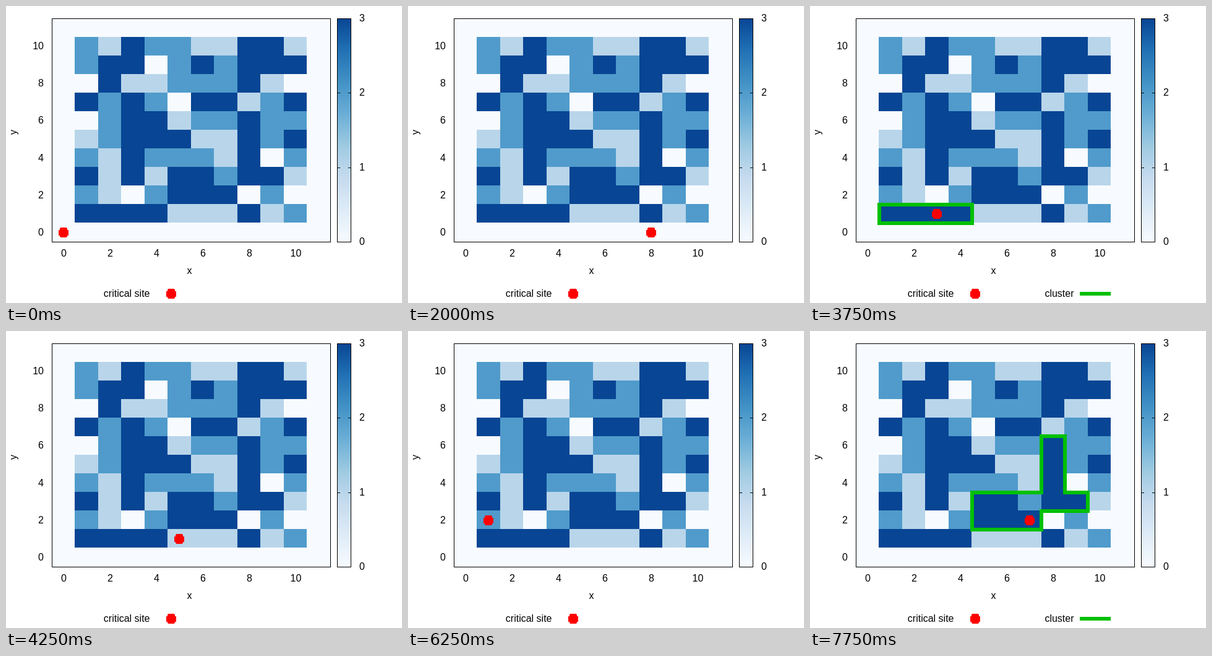
These frames come from a looping animation (640 by 480 pixels, 8000 ms). An HTML page with a canvas:

```html
<!DOCTYPE html>
<html lang="en">
<head>
<meta charset="utf-8">
<title>Critical site scan</title>
<style>
html, body { margin: 0; width: 100%; height: 100%; overflow: hidden; background: #fff; }
canvas { display: block; }
</style>
</head>
<body>
<canvas id="stage" width="640" height="480"></canvas>
<script>
const ctx = document.getElementById('stage').getContext('2d');

const LOOP = 8000, STEP = 250, COLS = 12;
const LEFT = 74, TOP = 20, BOTTOM = 381;
const CELL_W = 37.5, CELL_H = (BOTTOM - TOP) / COLS;
const RED = '#ff0000', GREEN = '#00c000';
const LEVELS = ['#f7fbff', '#b9d5ea', '#509bcb', '#084594'];
const BLUES = ['#f7fbff', '#deebf7', '#c6dbef', '#9ecae1',
               '#6baed6', '#4292c6', '#2171b5', '#084594'];

// Cell levels, top row (y = 10) first
const GRID = [
  '2132211331', '2330232333', '0311222310', '3232033123', '0233122322',
  '1233311323', '2132221302', '3131332331', '2102333020', '3333111312'
];

// Cluster outlines in axis units, keyed by the sites that reveal them
const CLUSTERS = [
  { y: 1, from: 1, to: 4, outline: [[.5, .5], [4.5, .5], [4.5, 1.5], [.5, 1.5]] },
  { y: 1, from: 8, to: 8, outline: [[7.5, .5], [8.5, .5], [8.5, 1.5], [7.5, 1.5]] },
  { y: 2, from: 5, to: 7, outline: [
    [4.5, 1.5], [7.5, 1.5], [7.5, 2.5], [9.5, 2.5], [9.5, 3.5],
    [8.5, 3.5], [8.5, 6.5], [7.5, 6.5], [7.5, 3.5], [4.5, 3.5]] }
];

const px = x => Math.round(LEFT + CELL_W * (x + .5));
const py = y => Math.round(BOTTOM - CELL_H * (y + .5));

function rect(color, x, y, w, h) {
  ctx.fillStyle = color;
  ctx.fillRect(x, y, w, h);
}

function frame(x, y, w, h) {
  ctx.strokeStyle = '#000';
  ctx.lineWidth = 1;
  ctx.strokeRect(x + .5, y + .5, w, h);
}

function text(label, x, y, align) {
  ctx.fillStyle = '#000';
  ctx.font = '16px "Liberation Sans", Arial, sans-serif';
  ctx.textAlign = align;
  ctx.fillText(label, x, y);
}

function marker(x, y) {
  rect(RED, x - 5, y - 8, 10, 16);
  rect(RED, x - 6, y - 7, 12, 14);
  rect(RED, x - 8, y - 4, 16, 9);
}

function drawCells() {
  rect(LEVELS[0], LEFT, TOP, 450, BOTTOM - TOP);
  GRID.forEach((row, r) => [...row].forEach((level, c) => {
    const x = Math.floor(LEFT + CELL_W * (c + 1));
    const y = Math.floor(TOP + CELL_H * (r + 1));
    const right = Math.floor(LEFT + CELL_W * (c + 2));
    const bottom = Math.floor(TOP + CELL_H * (r + 2));
    rect(LEVELS[level], x, y, right - x, bottom - y);
  }));
  frame(LEFT, TOP, 450, BOTTOM - TOP);
}

function drawColorBar() {
  const ramp = ctx.createLinearGradient(0, BOTTOM, 0, TOP);
  BLUES.forEach((color, i) => ramp.addColorStop(i / (BLUES.length - 1), color));
  rect(ramp, 535, TOP, 22, BOTTOM - TOP);
  frame(535, TOP, 22, BOTTOM - TOP);
  for (let v = 0; v <= 3; v++) {
    const y = Math.round(BOTTOM - v * (BOTTOM - TOP) / 3);
    if (v % 3) {
      rect('#000', 535, y, 5, 1);
      rect('#000', 553, y, 5, 1);
    }
    text(v, 571, y + 5, 'left');
  }
}

function drawLabels() {
  for (let v = 0; v <= 10; v += 2) {
    text(v, px(v) + .5, 405, 'center');
    text(v, 61, py(v) + 5, 'right');
  }
  text('x', 296.5, 433, 'center');
  ctx.save();
  ctx.translate(17, 204);
  ctx.rotate(-Math.PI / 2);
  text('y', 0, 0, 'center');
  ctx.restore();
  text('critical site', 232.5, 470, 'right');
  marker(267, 465);
}

function drawCluster(outline) {
  ctx.beginPath();
  outline.forEach(([x, y]) => ctx.lineTo(px(x), py(y)));
  ctx.closePath();
  ctx.strokeStyle = GREEN;
  ctx.lineWidth = 6;
  ctx.stroke();
  text('cluster', 426.5, 470, 'right');
  rect(GREEN, 436, 462, 50, 6);
}

function draw(time) {
  const step = Math.floor((time % LOOP) / STEP);
  const x = step % COLS, y = Math.floor(step / COLS);
  rect('#fff', 0, 0, 640, 480);
  drawCells();
  drawColorBar();
  drawLabels();
  const cluster = CLUSTERS.find(c => c.y === y && x >= c.from && x <= c.to);
  if (cluster) drawCluster(cluster.outline);
  marker(px(x), py(y));
}

const start = performance.now();
function tick() {
  draw(performance.now() - start);
  requestAnimationFrame(tick);
}
tick();
</script>
</body>
</html>
```
